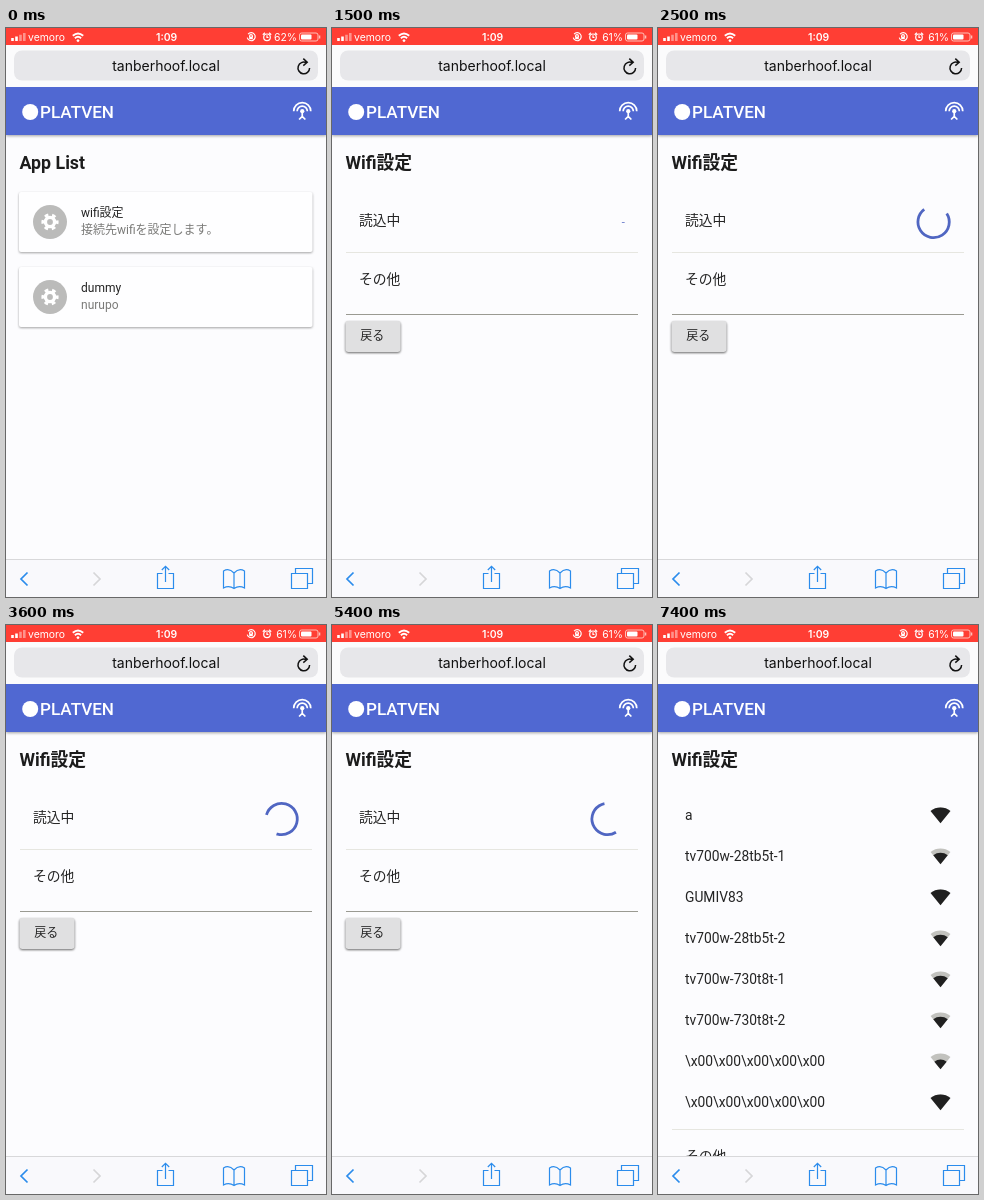
Recreate the animation shown at these times as an HTML page. Size 320x569 px, loop 8 s.

```html
<!DOCTYPE html>
<html lang="ja">
<head>
<meta charset="utf-8">
<title>Wifi設定</title>
<style>
html, body { margin: 0; width: 100%; height: 100%; overflow: hidden; background: #fcfcfe; }
svg { display: block; width: 100vw; height: 100vh; }
text { font-family: Roboto, "Noto Sans CJK JP", "Noto Sans CJK", sans-serif; font-size: 13.8px; fill: #242424; }
.ios text { font-family: Inter, sans-serif; font-size: 10.4px; fill: #fff; }
.ios .url { font-size: 14px; fill: #111; text-anchor: middle; }
.head { font-size: 17.8px; font-weight: 700; fill: #1c1c1c; }
.brand { font-size: 17.07px; font-weight: 500; fill: #fff; }
.small { font-size: 12px; }
.sub { font-size: 12px; fill: #7a7a78; }
.line { fill: none; stroke-width: 1.2; }
.card { fill: #fefeff; filter: drop-shadow(0 1px 1px #6669); }
.soft { stroke: #e6e6e0; }
</style>
</head>
<body>
<svg viewBox="0 0 320 569" preserveAspectRatio="none">
  <defs>
    <g id="gear">
      <circle r="17" fill="#bbbbba"/>
      <circle r="4.6" fill="none" stroke="#fff" stroke-width="3.4"/>
      <circle r="7.1" fill="none" stroke="#fff" stroke-width="3" stroke-dasharray="3.7 3.735" stroke-dashoffset="1.85"/>
    </g>
    <path id="fan" d="M0 0L-11.64-14.5Q-6.5-18.5 0-18.5T11.64-14.5Z"/>
    <g id="other">
      <path class="soft" d="M14 224.5H306"/>
      <text x="27" y="256">その他</text>
    </g>
  </defs>
  <rect width="320" height="569" fill="#fcfcfe"/>

  <g id="home">
    <text class="head" x="13.5" y="141">App List</text>
    <rect class="card" x="13" y="164" width="293.5" height="60" rx="2"/>
    <rect class="card" x="13" y="239" width="293.5" height="60" rx="2"/>
    <use href="#gear" x="44" y="194"/>
    <use href="#gear" x="44" y="269"/>
    <text class="small" x="75" y="188.5">wifi設定</text>
    <text class="sub" x="75" y="205.5">接続先wifiを設定します。</text>
    <text class="small" x="75" y="263.5">dummy</text>
    <text class="sub" x="75" y="280.5">nurupo</text>
  </g>

  <g id="wifi">
    <text class="head" x="13.5" y="141">Wifi設定</text>
    <g id="loading">
      <text x="27" y="197">読込中</text>
      <circle id="ring" r="20.2" fill="none" stroke="#5066c2" stroke-width="3.6"/>
      <use href="#other"/>
      <path d="M14 286.5H306" stroke="#9a9a92"/>
      <rect x="13.5" y="293" width="55" height="31" rx="3" fill="#e0e0e1" style="filter:drop-shadow(0 1px 1px #666)"/>
      <text class="small" x="28.3" y="312.3">戻る</text>
    </g>
    <g id="list"><use href="#other" y="280"/></g>
  </g>

  <!-- app bar -->
  <rect y="59" width="320" height="48" fill="#5068d2" style="filter:drop-shadow(0 1.5px 1.5px #6669)"/>
  <circle cx="24.2" cy="84" r="8" fill="#fff"/>
  <text class="brand" x="34" y="90">PLATVEN</text>
  <g transform="translate(286 73) scale(.853)" fill="none" stroke="#fff" stroke-width="2">
    <path d="M2 12A10 10 0 0 1 22 12M6 12A6 6 0 0 1 18 12M12 13V19M8.3 21.7L12 18L15.7 21.7"/>
    <circle cx="12" cy="12" r="2.5" fill="#fff" stroke="none"/>
  </g>

  <!-- browser -->
  <g class="ios">
    <rect width="320" height="17" fill="#ff3e34"/>
    <path d="M6.5 13V10M10.5 13V8.5" stroke="#fff" stroke-width="2.6"/>
    <path d="M14.5 13V6.8M18.3 13V5" stroke="#ff938c" stroke-width="2.6"/>
    <text x="22" y="12.8">vemoro</text>
    <g class="line" stroke="#fff" style="stroke-width:1.9">
      <path d="M66.8 7.8Q72 3.2 77.2 7.8M68.9 10.2Q72 7.4 75.1 10.2"/>
      <path d="M71 12L72 13L73 12"/>
    </g>
    <text x="160.6" y="12.8" text-anchor="middle" font-weight="600">1:09</text>
    <g class="line" stroke="#fff">
      <path d="M242.1 6.2A4 4 0 1 1 241.3 9.6"/>
      <path d="M243.6 9V8A1.4 1.4 0 0 1 246.4 8V9"/>
      <circle cx="261" cy="9.3" r="3.3"/>
      <path d="M261 7.3V9.5H262.5M256.8 6.8L258.9 4.8M265.2 6.8L263.1 4.8"/>
      <rect x="293.5" y="5" width="18.5" height="8" rx="2" stroke="#ffc0b8" style="stroke-width:1"/>
    </g>
    <rect x="243.2" y="8.6" width="3.6" height="2.6" fill="#fff"/>
    <text id="charge" x="291" y="12.8" text-anchor="end"></text>
    <rect x="295" y="6.4" width="10.5" height="5.2" rx="1" fill="#fff"/>
    <path d="M313.6 7.5V10.5" stroke="#ffc0b8" stroke-width="1.4"/>

    <rect y="17" width="320" height="42" fill="#fbfbfc"/>
    <rect x="8" y="22.5" width="304" height="30" rx="8" fill="#e7e7ea"/>
    <text class="url" x="160" y="43">tanberhoof.local</text>
    <path class="line" d="M300.3 34.7A5.8 5.8 0 1 0 303.6 40M297.3 30.6L301.2 34.3L297.3 37.6" stroke="#111" style="stroke-width:1.5"/>

    <rect y="531" width="320" height="38" fill="#f9f9fc"/>
    <path d="M0 531.5H320" stroke="#d8d8da"/>
    <g class="line" stroke="#2b8cec">
      <path d="M21.5 544.5L15 551L21.5 557.5" style="stroke-width:1.7"/>
      <path d="M87.5 544.5L94 551L87.5 557.5" stroke="#d6d6d8" style="stroke-width:1.7"/>
      <path d="M156.5 545.5H151.5V560.5H167.5V545.5H162.5M159.5 554V538.5M155.8 542L159.5 538.3L163.2 542"/>
      <path d="M228 545Q223 539.5 217.5 543V560Q223 557 228 560.5Q233 557 238.5 560V543Q233 539.5 228 545V560.5"/>
      <path d="M285.5 545.5H301.5V560.5H285.5ZM289.5 545.5V540.5H306.5V555.5H301.5"/>
    </g>
  </g>
</svg>
<script>
const LOOP = 8000, TICK = 100;
const BATTERY = 800, OPEN = 1500, SPIN = 1600, LOADED = 6400;
const TURN = 1400, AROUND = 2 * Math.PI * 20.2;
const $ = id => document.getElementById(id);

// name and strength of each network, 1 being full
const networks = [
  ["a", 1], ["tv700w-28tb5t-1", .73], ["GUMIV83", 1], ["tv700w-28tb5t-2", .73],
  ["tv700w-730t8t-1", .73], ["tv700w-730t8t-2", .73],
  ["\\x00\\x00\\x00\\x00\\x00", .62], ["\\x00\\x00\\x00\\x00\\x00", 1]
];
const fan = (y, size, color) =>
  `<use href="#fan" fill="${color}" transform="translate(282.5 ${y}) scale(${.853 * size})"/>`;
$("list").innerHTML += networks.map(([name, level], i) => {
  const y = 190 + 41 * i;
  return `<text x="27" y="${y + 4.7}">${name}</text>` +
    fan(y + 8.3, 1, "#c2c2be") + fan(y + 8.3, level, "#202020");
}).join("");

// cubic-bezier(.42, 0, .58, 1)
function easeInOut(x) {
  let lo = 0, hi = 1;
  for (let i = 0; i < 24; i++) {
    const s = (lo + hi) / 2;
    if (s * (1.26 - .78 * s + .52 * s * s) < x) lo = s; else hi = s;
  }
  return lo * lo * (3 - 2 * lo);
}

function spin(t) {
  const p = Math.max(0, t - SPIN) / TURN % 1;
  const grow = easeInOut(Math.min(1, p * 2));
  const shrink = easeInOut(Math.max(0, p * 2 - 1));
  const start = 15 * grow + 110 * shrink;
  const length = Math.min(1 + 99 * grow, AROUND - start);
  const ring = $("ring");
  ring.setAttribute("stroke-dasharray", `${length} 200`);
  ring.setAttribute("transform",
    `translate(275.6 194) scale(.7757) rotate(${360 * (p + start / AROUND)})`);
}

const show = (id, on) => $(id).style.display = on ? "" : "none";

function draw(now) {
  const t = Math.floor(now % LOOP / TICK) * TICK;
  show("home", t < OPEN);
  show("wifi", t >= OPEN);
  show("loading", t < LOADED);
  show("list", t >= LOADED);
  $("charge").textContent = t < BATTERY ? "62%" : "61%";
  spin(t);
}

let begin;
function frame(now) {
  begin ??= now;
  draw(now - begin);
  requestAnimationFrame(frame);
}
draw(0);
requestAnimationFrame(frame);
</script>
</body>
</html>
```
